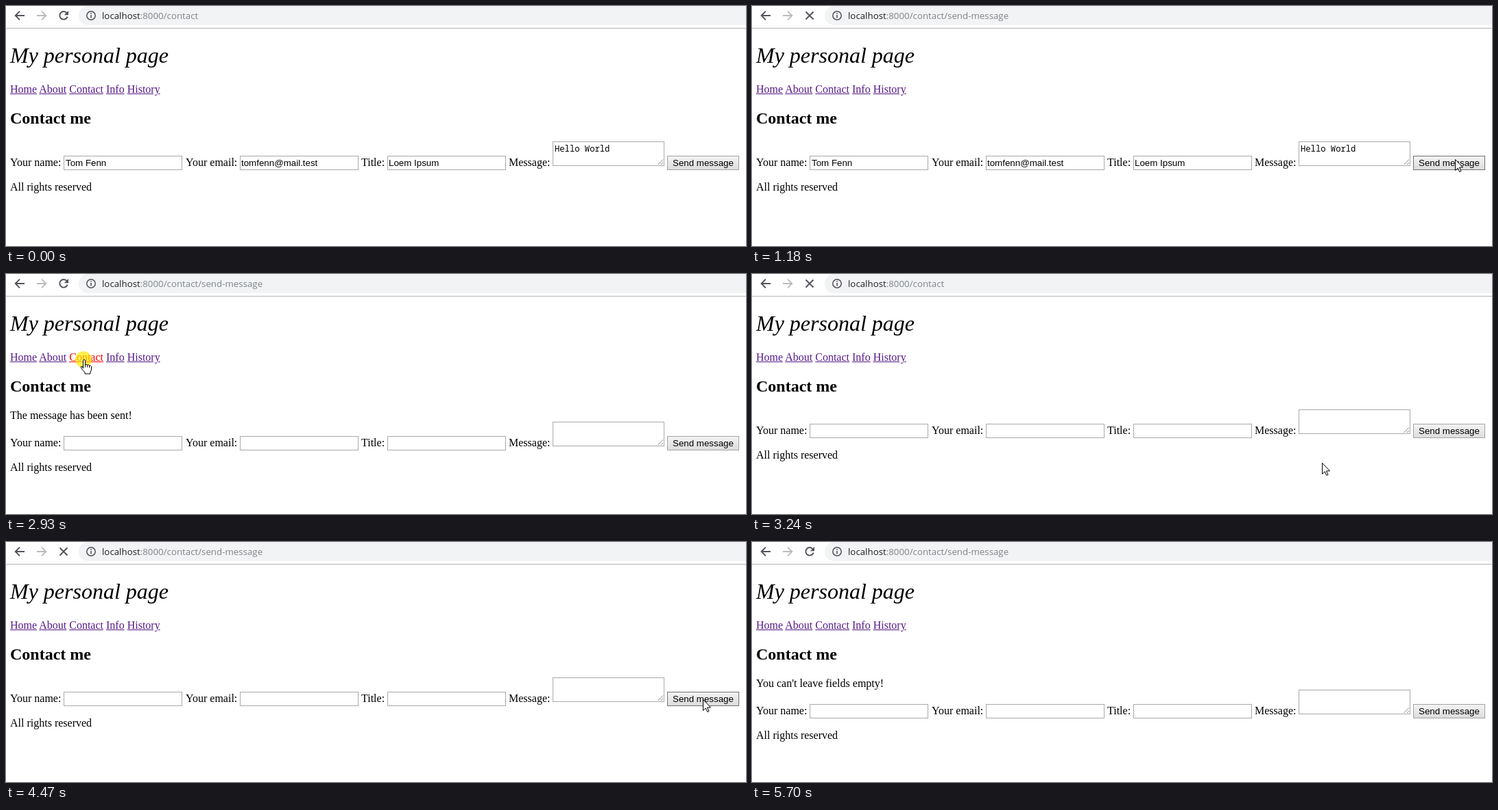
An HTML page for the animation above (6.11 s loop, 1079x351 px).

```html
<!DOCTYPE html>
<html lang="en">
<head>
<meta charset="utf-8">
<title>Contact form</title>
<style>
  html, body { margin: 0; width: 100%; height: 100%; overflow: hidden; background: #fff; }
  nav, svg { position: absolute; }
  nav { left: 6px; top: 113px; font: 16px/18px "Liberation Serif", serif; white-space: nowrap; }
  nav span { color: #551a8b; text-decoration: underline; }
  nav span.active { color: #f00; }
  svg { left: 0; top: 0; display: block; }
  .serif { font: 16px "Liberation Serif", serif; }
  .sans { font: 13.333px "Liberation Sans", Arial, sans-serif; }
  .mono { font: 12.2px "Noto Sans Mono", monospace; }
  .url { font: 13.3px "Open Sans", sans-serif; fill: #202124; }
  .box { fill: #fff; stroke: #a9a9a9; }
  .icon { fill: none; stroke: #55515b; stroke-width: 1.9; }
</style>
</head>
<body>
<nav><span>Home</span> <span>About</span> <span id="link">Contact</span> <span>Info</span> <span>History</span></nav>
<svg width="1079" height="351" viewBox="0 0 1079 351">
  <defs>
    <linearGradient id="raised" x2="0" y2="1">
      <stop stop-color="#f4f4f4"/><stop offset="1" stop-color="#dcdcdc"/>
    </linearGradient>
    <linearGradient id="pressed" x2="0" y2="1">
      <stop stop-color="#d6d6d6"/><stop offset="1" stop-color="#ebebeb"/>
    </linearGradient>
  </defs>

  <!-- browser bar -->
  <rect x="106" y="0" width="1000" height="28" rx="14" fill="#f1f3f4"/>
  <rect y="32" width="1079" height="1" fill="#b5b5b7"/>
  <path class="icon" d="M27 14H14.5M20 7.7L13.7 14L20 20.3"/>
  <path class="icon" d="M45 14H57.5M52 7.7L58.3 14L52 20.3" style="stroke:#b9bbbe"/>
  <g id="reload">
    <path class="icon" d="M88.6 10.2A5.8 5.8 0 1 0 89.6 15.6"/>
    <path d="M91 7V13.2H84.8Z" fill="#55515b"/>
  </g>
  <path id="stop" class="icon" d="M78.5 8.5L89.5 19.5M89.5 8.5L78.5 19.5"/>
  <circle cx="124" cy="14" r="6.2" class="icon" style="stroke-width:1.5"/>
  <path d="M124 10V11.6M124 13V17.6" class="icon" style="stroke-width:1.6"/>
  <text class="url" x="140" y="19">localhost<tspan id="path" fill="#80848a"></tspan></text>

  <!-- page -->
  <text class="serif" x="6" y="83" style="font-size:32px;font-style:italic">My personal page</text>
  <text class="serif" x="6" y="172" style="font-size:24px;font-weight:bold">Contact me</text>
  <text id="notice" class="serif" x="6" y="212"></text>
  <g id="form">
    <g class="serif">
      <text x="6" y="234">Your name:</text>
      <text x="262" y="234">Your email:</text>
      <text x="518" y="234">Title:</text>
      <text x="733" y="234">Message:</text>
      <text x="6" y="270">All rights reserved</text>
    </g>
    <g class="box">
      <rect x="84.5" y="219.5" width="172" height="20"/>
      <rect x="341.5" y="219.5" width="172" height="20"/>
      <rect x="556.5" y="219.5" width="172" height="20"/>
      <rect x="797.5" y="198.5" width="162" height="35"/>
    </g>
    <path d="M950.5 232L958 224.5M955 232L958 229" stroke="#858585" fill="none"/>
    <g id="values" class="sans">
      <text x="87" y="234">Tom Fenn</text>
      <text x="343" y="234">tomfenn@mail.test</text>
      <text x="558" y="234">Loem Ipsum</text>
      <text class="mono" x="800" y="213">Hello World</text>
    </g>
    <rect id="button" x="964.5" y="219.5" width="104" height="20"/>
    <text class="sans" x="972" y="234">Send message</text>
  </g>

  <!-- pointer -->
  <g id="pointer">
    <circle id="click" r="12" fill="#ffe800" opacity=".7"/>
    <g fill="#fff" stroke="#000" stroke-linejoin="round">
      <path id="arrow" d="M.5 .5V16.5L4.2 13L6.8 18.5L9 17.5L6.5 12H11.5Z"/>
      <g id="hand">
        <path d="M-.5 13V1.2Q1 -1 2.5 1.2V8Q4 6 5.5 8.2Q7 6.8 8.5 9Q10 8 11.5 10.2V15L10 18V21H2V19L-3.5 12.5Q-4.6 9.6 -2 10.2Z"/>
        <path d="M2.5 8V11.5M5.5 8.2V11.5M8.5 9V12" fill="none"/>
      </g>
    </g>
  </g>
</svg>
<script>
const LOOP = 6110;
const $ = id => document.getElementById(id);
const show = (id, on) => { $(id).style.display = on ? "" : "none"; };
const within = (t, ...spans) => spans.some(([a, b]) => t >= a && t < b);
const smooth = s => s * s * (3 - 2 * s);

// Pointer poses [time, x, y]; each holds until the next one.
const poses = [
  [70, 1037, 331], [150, 1034, 292], [230, 1030, 256], [310, 1027, 234],
  [390, 1026, 224], [780, 1025, 224],
  ...sweep(1940, 2530, 9, [1023, 225], [122, 136], 35),
  [2610, 115, 127], [2690, 113, 125],
  [3070, 190, 142], [3170, 472, 196],
  [3240, 831, 276], [3320, 975, 262], [3390, 1046, 249], [3470, 1062, 240],
  ...sweep(3550, 3850, 5, [1057, 236], [1019, 230], 0),
  [3910, 1016, 230],
  [5240, 1014, 236], [5320, 1004, 252], [5390, 985, 275],
  [5470, 960, 302], [5550, 936, 325], [5620, 912, 342]
];

// Eased move in equal steps, sagging by `bend` pixels midway.
function sweep(t0, t1, count, [x0, y0], [x1, y1], bend) {
  return Array.from({ length: count }, (_, i) => {
    const u = i / (count - 1), s = smooth(u);
    return [
      t0 + (t1 - t0) * u,
      Math.round(x0 + (x1 - x0) * s),
      Math.round(y0 + (y1 - y0) * s + bend * 4 * s * (1 - s))
    ];
  });
}

function noticeAt(t) {
  if (within(t, [1410, 3240])) return "The message has been sent!";
  return t >= 4700 ? "You can't leave fields empty!" : "";
}

function drawPointer(t) {
  const visible = within(t, [70, 5700]);
  show("pointer", visible);
  if (!visible) return null;
  const [, x, y] = poses.findLast(p => p[0] <= t);
  const onLink = within(t, [2610, 3070]);
  $("pointer").setAttribute("transform", `translate(${x} ${y})`);
  show("hand", onLink);
  show("arrow", !onLink);
  show("click", within(t, [1080, 1180], [2850, 2990], [4310, 4470]));
  return { x, y };
}

function render(t) {
  const notice = noticeAt(t);
  const shift = notice ? 18 : 0;
  const loading = within(t, [1180, 1410], [2990, 3320], [4470, 4700]);
  const sent = within(t, [1180, 2990], [4470, LOOP]);
  const pressed = within(t, [1080, 1180], [4310, 4470]);
  const tip = drawPointer(t);
  const hover = tip && tip.x >= 964 && tip.x < 1069 &&
    tip.y >= 219 + shift && tip.y < 240 + shift;

  $("path").textContent = ":8000/contact" + (sent ? "/send-message" : "");
  show("stop", loading);
  show("reload", !loading);
  $("link").className = within(t, [2850, 2990]) ? "active" : "";
  $("notice").textContent = notice;
  $("form").setAttribute("transform", `translate(0 ${shift})`);
  show("values", t < 1410);
  $("button").setAttribute("fill", `url(#${pressed ? "pressed" : "raised"})`);
  $("button").setAttribute("stroke", hover ? "#707070" : "#a3a3a3");
}

const start = performance.now();
function tick() {
  render((performance.now() - start) % LOOP);
  requestAnimationFrame(tick);
}
tick();
</script>
</body>
</html>
```
